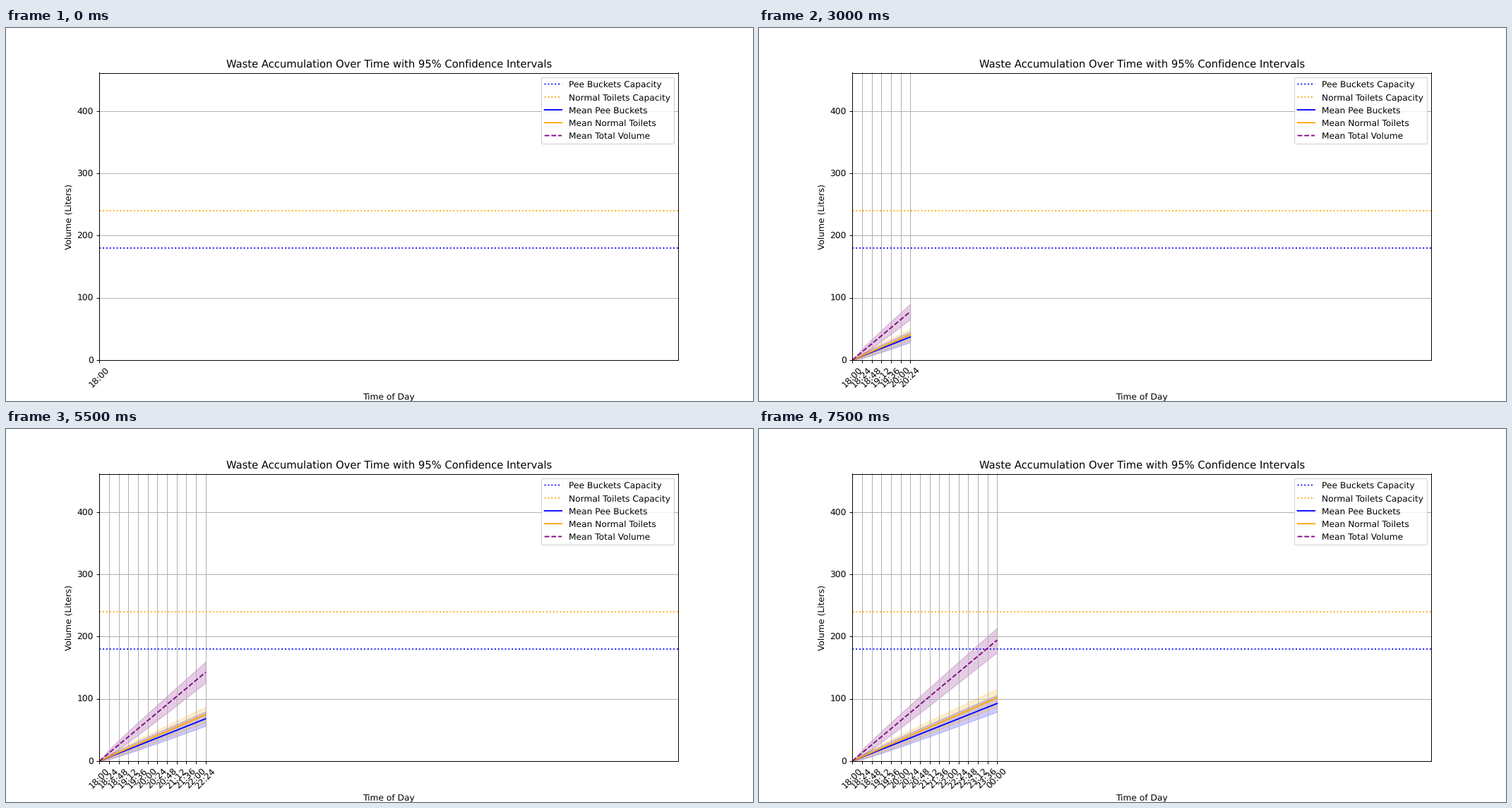
Recreate the animation shown at these times as a matplotlib script. Size 1058 px wide and 529 px high, loop 8 s.

```python
import numpy as np
import matplotlib.pyplot as plt
from matplotlib.animation import FuncAnimation

DPI = 529 / 6 + 1e-6
FRAMES = 16
INTERVAL = 500
STEPS = 60            # 24 hours in steps of 24 minutes
STEP_MINUTES = 24
START_MINUTE = 18 * 60

PEE_CAPACITY = 180
TOILET_CAPACITY = 240

# label, colour, line style, litres per step, half band width at step one
SERIES = [
    ("Mean Pee Buckets", "blue", "-", 6.17, 3.5),
    ("Mean Normal Toilets", "orange", "-", 6.79, 3.7),
    ("Mean Total Volume", "purple", "--", 12.96, 5.1),
]

# Unhinted glyphs keep text widths proportional to the font size.
plt.rcParams["text.hinting"] = "none"


def clock(step):
    minute = START_MINUTE + step * STEP_MINUTES
    return f"{minute // 60 % 24:02d}:{minute % 60:02d}"


def capacity_line(level, color, label):
    ax.axhline(level, color=color, linestyle=":", label=label, snap=False)


fig, ax = plt.subplots(figsize=(12, 6), dpi=DPI)
ax.spines["top"].set_position(("outward", -0.36))
ax.set_xlim(0, STEPS)
ax.set_ylim(0, 1.1 * (PEE_CAPACITY + TOILET_CAPACITY))
ax.set_title("Waste Accumulation Over Time with 95% Confidence Intervals")
ax.set_xlabel("Time of Day")
ax.set_ylabel("Volume (Liters)")
ax.tick_params(axis="x", rotation=45)
ax.grid(True)

capacity_line(PEE_CAPACITY, "blue", "Pee Buckets Capacity")
capacity_line(TOILET_CAPACITY, "orange", "Normal Toilets Capacity")
lines = [ax.plot([], [], color=color, linestyle=style, label=label)[0]
         for label, color, style, _, _ in SERIES]
legend = ax.legend(loc="upper right", labelspacing=0.54, borderpad=0.42)
for handle in legend.get_lines():
    handle.set_snap(False)
bands = []


def update(frame):
    steps = np.arange(frame + 1)
    while bands:
        bands.pop().remove()
    for line, (_, color, _, rate, spread) in zip(lines, SERIES):
        mean = rate * steps
        margin = spread * np.sqrt(steps)
        line.set_data(steps, mean)
        if frame:
            bands.append(ax.fill_between(steps, mean - margin, mean + margin,
                                         color=color, alpha=0.2))
    ax.set_xlim(0, STEPS)
    ax.set_xticks(steps, [clock(s) for s in steps])
    return lines + bands


def reset():
    return update(0)


anim = FuncAnimation(fig, update, frames=FRAMES, init_func=reset,
                     interval=INTERVAL, repeat=True, repeat_delay=0, blit=False)
plt.show()
```
